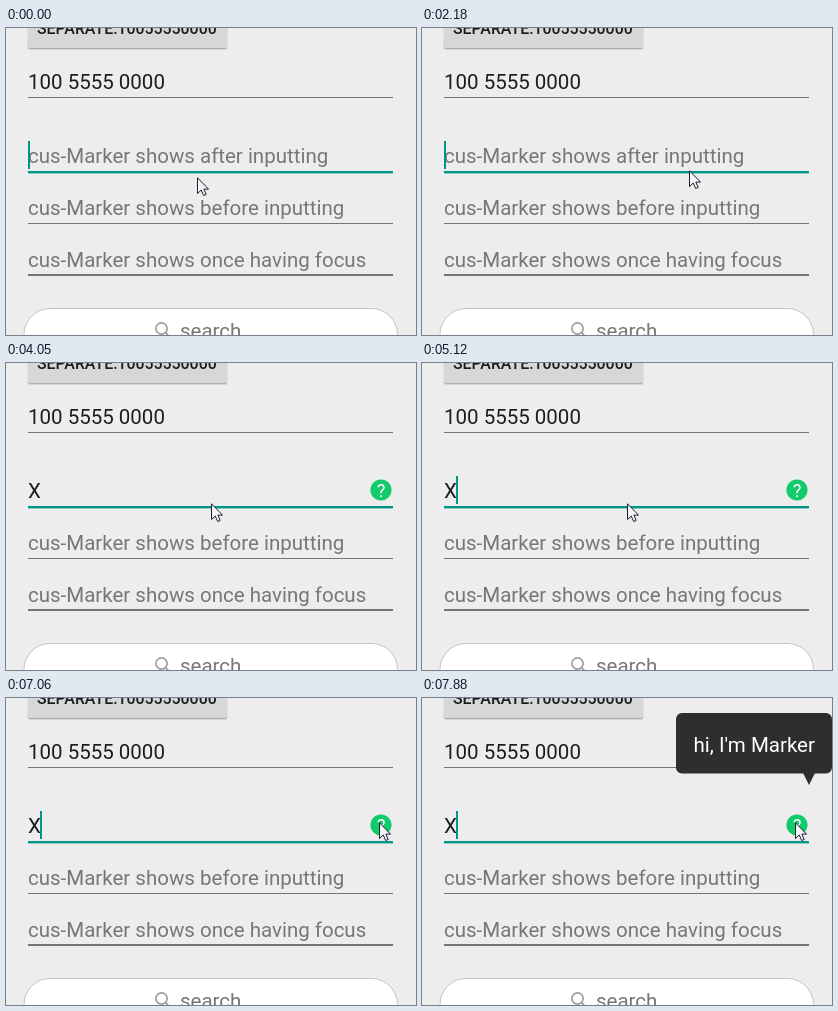
These frames come from a looping animation (410 px wide and 307 px high, 8 s). An HTML page:

```html
<!DOCTYPE html>
<html lang="en">
<head>
<meta charset="utf-8">
<title>Marker input</title>
<style>
  html, body { margin: 0; width: 100%; height: 100%; overflow: hidden; background: #ededed; }
  svg { display: block; width: 410px; height: 307px; }
  text { font: 20.5px Roboto, sans-serif; fill: #1c1c1c; }
  .hint { fill: #777; }
  .line { fill: #757575; }
  .accent { fill: #009688; }
  .button { font-size: 15.9px; font-weight: 500; }
  .mark { font-size: 18.5px; fill: #fff; text-anchor: middle; }
</style>
</head>
<body>
<svg viewBox="0 0 410 307">
  <rect x="21.5" y="-20" width="200" height="42" rx="2.5" opacity=".1"/>
  <rect x="22" y="-20" width="199" height="41" rx="2.5" opacity=".18"/>
  <rect x="22" y="-20" width="199" height="40" rx="2" fill="#d6d7d7"/>
  <text class="button" x="31" y="6">SEPARATE:10055550000</text>

  <text x="22" y="61">100 5555 0000</text>
  <rect class="line" x="22" y="69" width="365" height="1"/>

  <text id="hint" class="hint" x="22" y="135">cus-Marker shows after inputting</text>
  <g id="filled">
    <text x="22" y="135">X</text>
    <circle cx="375" cy="127" r="10.6" fill="#12cb6b"/>
    <text class="mark" x="375" y="133.6">?</text>
  </g>
  <rect class="accent" x="22" y="143" width="365" height="2.4"/>
  <rect id="caret" class="accent" y="113" width="2" height="28"/>

  <text class="hint" x="22" y="187">cus-Marker shows before inputting</text>
  <rect class="line" x="22" y="195" width="365" height="1"/>
  <text class="hint" x="22" y="239">cus-Marker shows once having focus</text>
  <rect class="line" x="22" y="246" width="365" height="2"/>

  <rect x="18" y="280.5" width="373.5" height="54" rx="26" fill="#fff" stroke="#c4c4c4"/>
  <g fill="none" stroke="#999" stroke-width="1.6">
    <circle cx="155.5" cy="300.5" r="5.6"/>
    <path d="M159.6 304.6l4.6 4.6"/>
  </g>
  <text class="hint" x="174" y="310">search</text>

  <g id="tip" fill="#2e2e2e">
    <path d="M380.5 74h13l-6.5 13z"/>
    <rect x="254" y="15" width="156" height="60.5" rx="6"/>
    <text x="271.5" y="54" style="fill:#fff">hi, I'm Marker</text>
  </g>

  <path id="pointer" d="M.5 .8V16.5L4.2 13 6.7 18.5 9.2 17.4 6.8 12.1H11.5Z"
        fill="#f6f6fa" stroke="#1c1c30" stroke-linejoin="round"/>
</svg>
<script>
const LOOP = 8000, TICK = 135, BLINK = 470, PRESS = 7100;
const $ = id => document.getElementById(id);

// Pointer path: time, x, y
const PATH = [
  [270, 191, 149], [660, 188, 135], [1080, 245, 108], [1350, 292, 110],
  [1890, 326, 139], [2300, 237, 144], [2810, 205, 140],
  [6075, 205, 140], [6210, 218, 136], [6345, 301, 109], [6885, 373, 124]
];
// Each edit toggles between empty and "X" and restarts the caret blink
const EDITS = [-75, 3490, 4480, 5120];

const clamp = v => Math.min(1, Math.max(0, v));

function pointerAt(t) {
  const next = PATH.findIndex(key => key[0] > t);
  if (next < 1) return PATH.at(next).slice(1);
  const [t0, x0, y0] = PATH[next - 1], [t1, x1, y1] = PATH[next];
  const k = (t - t0) / (t1 - t0);
  return [x0 + (x1 - x0) * k, y0 + (y1 - y0) * k].map(Math.round);
}

function draw(t) {
  const edit = EDITS.findLastIndex(time => time <= t);
  const filled = edit % 2;
  const blinkedOff = Math.floor((t - EDITS[edit]) / BLINK) % 2;
  const caretOn = t > PRESS || !blinkedOff;

  $("hint").style.opacity = 1 - filled;
  $("filled").style.opacity = filled;
  $("caret").setAttribute("x", filled ? 34 : 22);
  $("caret").style.opacity = +caretOn;
  $("tip").style.opacity = clamp((t - 7600) / 270);

  // The pointer moves in ticks, like a screen recording
  const [x, y] = pointerAt(Math.floor(t / TICK) * TICK);
  $("pointer").setAttribute("transform", `translate(${x} ${y})`);
}

const start = performance.now();
function frame() {
  draw((performance.now() - start) % LOOP);
  requestAnimationFrame(frame);
}
frame();
</script>
</body>
</html>
```
